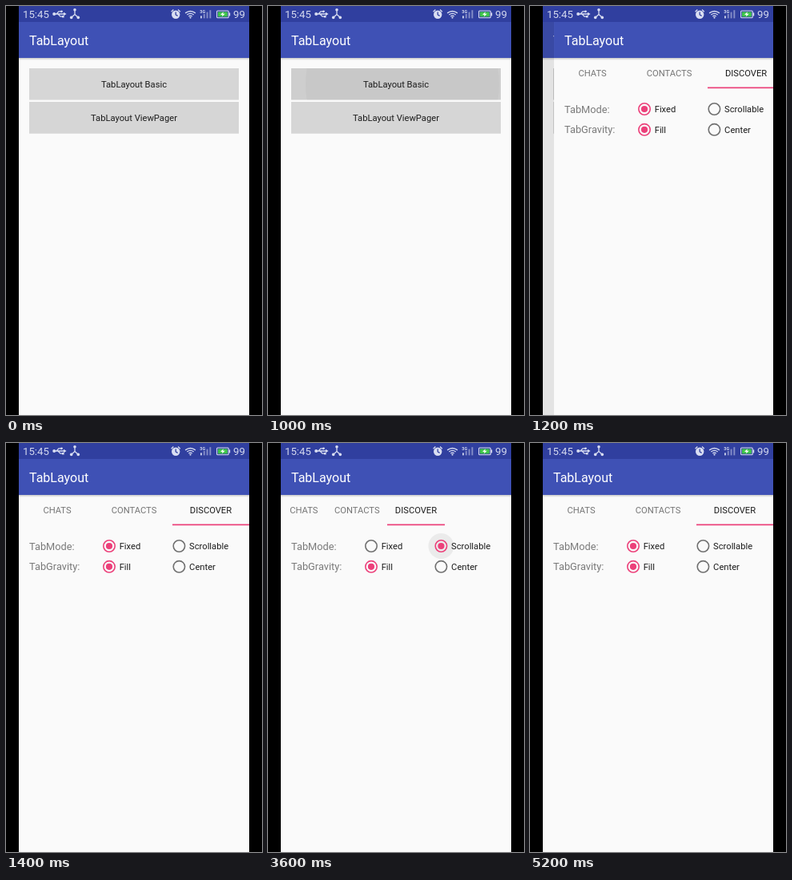
These frames come from a looping animation (320x512 px, 6400 ms). An HTML page:

```html
<!DOCTYPE html>
<html lang="en">
<head>
<meta charset="utf-8">
<title>TabLayout</title>
<style>
html, body { margin: 0; width: 100%; height: 100%; overflow: hidden; background: #000; }
svg { display: block; width: 100%; height: 100%; font-family: Roboto, sans-serif; }
.title { font-size: 16px; fill: #fff; }
.small { font-size: 11.2px; fill: #1c1c1c; }
.label { font-size: 12.8px; fill: #7a7a7a; }
.mid { text-anchor: middle; }
.clock { font-size: 13.2px; fill: #d3d8ee; }
.icon { fill: none; stroke: #d9def2; stroke-width: 1.3; }
.solid { fill: #d9def2; stroke: none; }
</style>
</head>
<body>
<svg id="stage" viewBox="0 0 320 512"></svg>
<script>
const LOOP = 6400, STEP = 100;
const PINK = [236, 64, 122], GREY = [112, 112, 112];
const LEFT = 16, WIDTH = 288;

const text = (x, y, cls, s, id = '') => `<text x="${x}" y="${y}" class="${cls}" id="${id}">${s}</text>`;
const rect = (x, y, w, h, fill, more = '') =>
  `<rect x="${x}" y="${y}" width="${w}" height="${h}" fill="${fill}" ${more}/>`;
const dot = (x, y, r, more = '') => `<circle cx="${x}" cy="${y}" r="${r}" ${more}/>`;

const page = body => rect(16, 20, 288, 492, '#fafafa') + rect(16, 65, 288, 3, 'url(#shade)') +
  rect(16, 20, 288, 45, '#3f51b5') + text(29, 49, 'title', 'TabLayout') + body;

const radio = (id, x, y, label) =>
  dot(x, y, 0, `id="${id}Wave" fill="#000"`) +
  dot(x, y, 7.2, `id="${id}Ring" fill="none" stroke-width="1.6"`) +
  dot(x, y, 4, `id="${id}Dot"`) + text(x + 12.7, y + 4.2, 'small', label);

const usb = `<g class="icon"><path d="M60 10H73M63 10L66 6.8H69M65 10L68 13.2H71"/>
  ${dot(60.2, 10, 2, 'class="solid"')}${dot(69.5, 6.8, 1.4, 'class="solid"')}
  <path class="solid" d="M72 7.8L75.6 10L72 12.2ZM70 11.9h2.6v2.6h-2.6z"/></g>`;

const nodes = `<g class="icon"><path d="M86 5V10.5L81.6 14.6M86 10.5L90.4 14.6"/>
  ${[[86, 4.8], [81.7, 14.4], [90.3, 14.4]].map(p => dot(...p, 1.8, 'class="solid"')).join('')}</g>`;

const alarm = `<g class="icon">${dot(212.2, 10.8, 5.2, 'class="solid"')}
  <path d="M206.6 7.2L209.4 4.6M217.8 7.2L215 4.6"/>
  <path stroke="#303f9f" style="stroke:#303f9f" d="M212.2 7.6V11L214.6 12.4"/></g>`;

const arc = r => `M${230.5 - r * .75} ${15 - r * .72}Q230.5 ${15 - r * 1.28} ${230.5 + r * .75} ${15 - r * .72}`;
const wifi = `<g class="icon"><path d="${arc(8.5)}${arc(5.6)}${arc(2.9)}"/>${dot(230.5, 14.6, 1.1, 'class="solid"')}</g>`;

const signal = text(242.3, 8.6, '', '3G').replace('class=""', 'font-size="5.4" font-weight="700" fill="#d9def2"') +
  [0, 1, 2, 3].map(i => rect(243 + i * 3.8, 12.4 - i * 2.4, 1.9, 3 + i * 2.4, '#d9def2',
    `opacity="${i ? .5 : .9}"`)).join('');

const battery = `<g>${rect(263.6, 6, 14.6, 8.8, 'none', 'rx="1" stroke="#d9def2" stroke-width="1.1"')}
  ${rect(278.7, 8.4, 1.5, 4, '#d9def2')}${rect(265, 7.4, 11.8, 6, '#3fc64a')}
  <path fill="#fff" d="M271.8 7.2L268 11H270.6L269.8 13.6L273.8 9.8H271.2Z"/></g>`;

const stage = document.getElementById('stage');
stage.innerHTML = `
<defs>
  <linearGradient id="shade" x2="0" y2="1">
    <stop stop-opacity=".2"/><stop offset="1" stop-opacity="0"/>
  </linearGradient>
  <clipPath id="screen">${rect(16, 0, 288, 512, '#000')}</clipPath>
  <clipPath id="button">${rect(29, 78, 262, 39.5, '#000')}</clipPath>
</defs>
${rect(0, 0, 320, 512, '#000')}
<g clip-path="url(#screen)">
  <g>${page(
    rect(29, 78, 262, 39.5, '#d6d6d6') +
    `<g clip-path="url(#button)">${rect(29, 78, 262, 39.5, '#000', 'id="press"')}
      ${dot(168, 98, 0, 'id="ripple" opacity=".03"')}</g>` +
    rect(29, 120, 262, 39.7, '#d6d6d6') +
    text(160, 101.6, 'small mid', 'TabLayout Basic') +
    text(160, 143.8, 'small mid', 'TabLayout ViewPager'))}
  </g>
  ${rect(16, 20, 288, 492, '#000', 'id="dim"')}
  <g id="detail">${page(
    ['CHATS', 'CONTACTS', 'DISCOVER'].map((s, i) => text(0, 88.4, 'small mid', s, 'tab' + i)).join('') +
    rect(0, 101.5, 0, 1.7, '#ec407a', 'id="bar"') +
    text(29, 133.7, 'label', 'TabMode:') + text(29, 159.4, 'label', 'TabGravity:') +
    radio('fixed', 129, 129, 'Fixed') + radio('scroll', 216.4, 129, 'Scrollable') +
    radio('fill', 129, 154.8, 'Fill') + radio('center', 216.4, 154.8, 'Center'))}
  </g>
  ${rect(16, 0, 288, 20, '#303f9f')}
  ${text(21, 15, 'clock', '15:45')}${usb}${nodes}${alarm}${wifi}${signal}${battery}
  ${text(284, 15, 'clock', '99')}
</g>`;

const el = {};
stage.querySelectorAll('[id]').forEach(n => { el[n.id] = n; });
const set = (id, attrs) => { for (const k in attrs) el[id].setAttribute(k, attrs[k]); };
const ramp = (t, a, b) => Math.min(1, Math.max(0, (t - a) / (b - a)));
const mix = k => `rgb(${GREY.map((g, i) => Math.round(g + (PINK[i] - g) * k))})`;

function setRadio(id, on) {
  set(id + 'Ring', { stroke: mix(on) });
  set(id + 'Dot', { r: 4.1 * on, fill: mix(on) });
}

function setWave(id, t, start, end) {
  const active = t >= start && t < end;
  set(id + 'Wave', {
    r: active ? 6 + 10 * ramp(t, start, start + 200) : 0,
    opacity: .12 * (1 - ramp(t, start + 200, end))
  });
}

function draw(ms) {
  const t = Math.floor(ms % LOOP / STEP) * STEP;

  // button press
  const hold = ramp(t, 500, 800);
  set('press', { opacity: .035 * hold });
  set('ripple', { r: t < 600 ? 0 : 20 + 101 * ramp(t, 600, 1000) });

  // page slide, decelerating
  const slide = ramp(t, 1000, 1400);
  const shift = WIDTH * Math.pow(1 - slide, 4.36);
  set('detail', { transform: `translate(${shift} 0)`, visibility: slide ? 'visible' : 'hidden' });
  set('dim', { opacity: .1 * (1 - shift / WIDTH) });

  // tab mode
  const scrolling = t >= 3400 && t < 4900;
  const edges = scrolling ? [16, 73.6, 149, 221] : [0, 1, 2, 3].map(i => LEFT + i * WIDTH / 3);
  for (let i = 0; i < 3; i++) {
    set('tab' + i, { x: (edges[i] + edges[i + 1]) / 2 });
    el['tab' + i].style.fill = i === 2 ? '#1c1c1c' : '#757575';
  }
  set('bar', { x: edges[2], width: edges[3] - edges[2] });

  const mode = ramp(t, 3300, 3600) - ramp(t, 4800, 5100);
  setRadio('fixed', 1 - mode);
  setRadio('scroll', mode);
  setRadio('fill', 1);
  setRadio('center', 0);
  setWave('scroll', t, 3200, 3800);
  setWave('fixed', t, 4700, 5200);
}

const begin = performance.now();
function tick() {
  draw(performance.now() - begin);
  requestAnimationFrame(tick);
}
tick();
</script>
</body>
</html>
```
